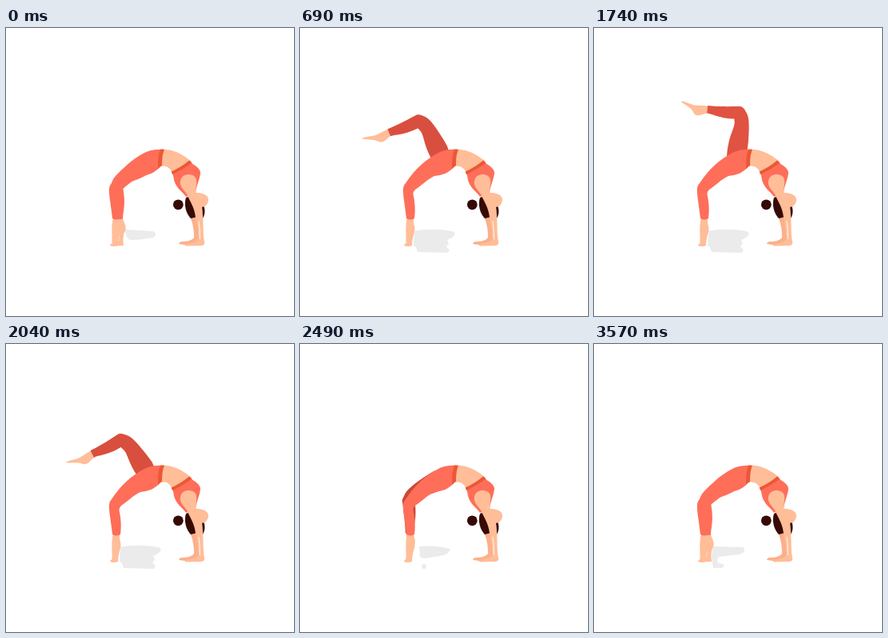
Write an HTML page that moves like this. It is 360x360 px and loops after 3600 ms.

```html
<!DOCTYPE html>
<html lang="en">
<head>
<meta charset="utf-8">
<title>Bridge pose</title>
<style>
html, body { margin: 0; width: 100%; height: 100%; overflow: hidden; background: #fff; }
svg { display: block; width: 100vw; height: 100vh; }
.skin { fill: #ffbd98; }
.far { fill: #fbb08b; }
.front { fill: #fe6e59; }
.band { fill: #ec5735; }
.hair { fill: #360b06; }
.gap { fill: none; stroke: #fff1e8; stroke-width: 1.2; }
#shadow { fill: #ebebeb; }
</style>
</head>
<body>
<svg viewBox="0 0 360 360">
  <path id="shadow"/>

  <g id="thigh">
    <path class="back" d="M0 -15 C8 -15 15 -14 21 -12.6 C32 -10 38 -6.5 44 -6.5 L56 -8 A8 8 0 0 1 58 7 C54 10 49 11 44 11.3 C36 12 28 11.6 20 11.3 L10 10.5 L-2 7 Z"/>
    <g id="shin">
      <g id="foot"><path id="sole" class="skin"/></g>
      <path class="back" d="M0 -8 C8 -9 14 -9 20 -8.5 C30 -7.5 36 -5 41 -4.8 L41 4.8 C30 4.5 20 5.5 0 7.500 A8 8 0 0 1 0 -8 Z"/>
    </g>
  </g>

  <path class="skin" d="M134 237 L142 237 C141 245 145 249 143 255 C141 262 140 266 140 272 Q135 274 130 272 Q130 270 132.500 269 C133 257 131 249 134 237 Z"/>
  <path class="front" d="M196 151.500 C185 152 179 153 174 155.500 C165 160 158 165 152 170.500 C143 178 137 187 130.500 196 C128 200 129 206 129.500 212 C131 222 132 230 133 238 Q138 241 143 238 C144.500 227 143.500 217 141.500 208 Q141 205 144 202 C152 197 159 189 168 185 C177 184 186 182 194 172 Z"/>
  <path class="skin" d="M196 151.500 C210 152 221 158 232 167 L208 181 C205 175 201 171 193 173 Z"/>
  <path class="band" d="M193 151.800 L198 151.700 C195 159 195 166 195 172 Q192.500 173 190 176 C190 167 190 159 193 151.800 Z"/>

  <path class="hair" d="M225 212 C222 221 225 233 232 239 L246 238 Q250 231 247.500 223 L236 208 Z"/>
  <circle class="hair" cx="215.300" cy="220.800" r="6.400"/>
  <path class="skin" d="M237 206 C243 206 252 207 253 214 C253 220 249 224 244 224 L237 222 Z"/>

  <path class="front" d="M230 167 C235 172 241 173 243 180 C243 187 239 194 237 205 L225 211 C221 205 214 201 211 193 C209 188 210 184 207 181 Z"/>
  <path class="band" d="M229 165.500 L232.500 168.500 Q221 177 208.500 183 L206.500 179.500 Q219 174 229 165.500 Z"/>

  <path class="skin far" d="M231 238 L239 236 L241 262 L241 271 C233 273 224 271 216 270 Q216 268 219 267 C226 267 232 266 235 262 C235 254 234 246 231 238 Z"/>
  <path class="skin" d="M219 188 C222 182 233 181 237 187 C240 193 236 201 238 207 C244 213 246 226 246 236 C247 248 246 258 248 267 Q249 271 245 272 L225 272.500 Q222 271 226 270 C234 269 240 267 241 262 C240 252 239 246 237 237 C236 226 231 218 227.500 211 C226 204 214 199 219 188 Z"/>
  <path class="gap" d="M241 241 Q242.500 252 242.500 264"/>
</svg>
<script>
const LOOP = 3600, HIP = [181, 162], THIGH = 56.5, SHIN = 41;
const $ = id => document.getElementById(id);
const mix = (a, b, p) => a + (b - a) * p;
const clamp = v => Math.min(1, Math.max(0, v));
const ease = u => u < .5 ? 2 * u * u : 1 - 2 * (1 - u) ** 2;
const ramp = (t, from, to) => ease(clamp((t - from) / (to - from)));

// [start time, ground shadow]
const shadows = [
  [0, 'M149 252 L184 254 Q190 257 184 262 Q168 265 155 265 Q149 261 149 252 Z'],
  [240, 'M156 255 Q161 252 167 257 Q167 261 160 259 Q156 258 156 255 Z'],
  [570, 'M143 254 C155 251 180 251 193 255 Q196 260 184 265 L186 270 Q180 273 187 277 L185 281 L147 280 L145 274 L142 272 Z'],
  [2190, 'M149 253 Q170 251 188 256 Q187 263 175 265 L155 268 L150 266 Z M152 278 a3 3 0 1 0 6 0 a3 3 0 1 0 -6 0 Z'],
  [2640, 'M148 253 L186 254 Q192 259 182 263 L156 266 Q152 271 156 274 L163 276 L160 280 L149 280 L147 268 Z']
];

const backParts = document.querySelectorAll('.back');
const place = (id, x, y, angle) => $(id).setAttribute('transform', `translate(${x} ${y}) rotate(${angle})`);

function draw(t) {
  const lift = ramp(t, 165, 1010) - ramp(t, 1650, 2610);
  const thigh = mix(140, 274, lift);
  const shin = mix(85, 187, lift);
  const foot = mix(88, 199, lift);
  place('thigh', ...HIP, thigh);
  place('shin', THIGH, 0, shin - thigh);
  place('foot', SHIN, 0, foot - shin);

  // Toes spread while they carry weight; the heel shows more as the foot flexes.
  const w = clamp(1 - lift / .12);
  const toe = mix(34, 33, w), spread = mix(.6, 4.5, w);
  const heel = mix(6, 11, lift) + 2 * w;
  $('sole').setAttribute('d', `M-3 -4.5 C3 -5 6 ${-heel} 11 ${-heel} C15 ${-heel} 16 ${-heel * .7} 20 -5
    C24 -4 28 ${-2 - spread / 2} ${toe} ${-spread} L${toe} ${spread} C27 1 22 0 18 .3 C12 1 6 4 -3 4.5 Z`);

  const tone = [[200, 224], [72, 82], [54, 66]].map(([a, b]) => Math.round(mix(a, b, lift)));
  const color = lift > 0 ? `rgb(${tone})` : '#fe6e59';
  backParts.forEach(el => el.style.fill = color);
  $('shadow').setAttribute('d', shadows.filter(s => s[0] <= t).pop()[1]);
}

function tick() {
  draw(performance.now() % LOOP);
  requestAnimationFrame(tick);
}
tick();
</script>
</body>
</html>
```
